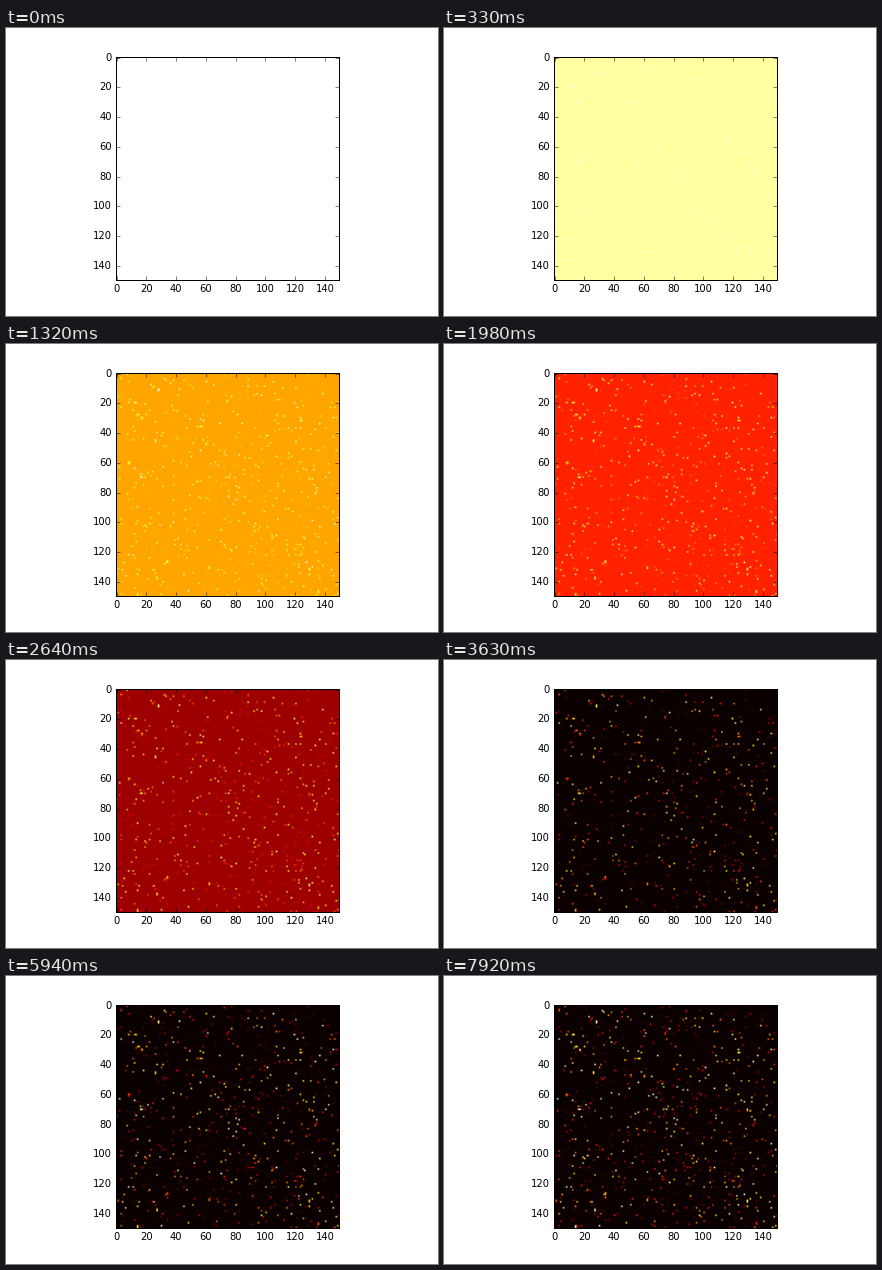
These frames come from a looping animation (432 px wide and 288 px high, 8 s). A matplotlib script:

```python
import numpy as np
import matplotlib.pyplot as plt
from matplotlib.animation import FuncAnimation

SIZE = 150          # cells per side
DOTS = 760          # cells that do not simply fade out
STEPS = 25
STEP_MS = 330
FADE = 0.0972       # loss per step
TURN = 11           # step at which the background has gone dark
TICK_MS = 20
LOOP_MS = 8000

plt.style.use("classic")
plt.rcParams.update({
    "font.family": "DejaVu Sans",
    "font.size": 10,
    "xtick.labelsize": 10,
    "ytick.labelsize": 10,
    "figure.facecolor": "white",
})


def dot_levels(rng):
    """Level of every dot at every step: uneven decay, then slow recovery."""
    fall = 1 - 0.9 * rng.random(DOTS) ** 1.6
    levels = np.ones((STEPS, DOTS))
    for s in range(1, STEPS):
        roll = rng.random(DOTS)
        if s <= TURN:
            change = -FADE * (0.6 * fall + 0.4 * (roll < fall))
        else:
            change = np.where(roll < 0.4, -FADE, FADE) / 2
        levels[s] = np.clip(levels[s - 1] + change, 0, 1)
    return levels


rng = np.random.default_rng(12)
cells = rng.choice(SIZE * SIZE, DOTS, replace=False)
levels = dot_levels(rng)


def field(step):
    base = max(0.0, 1 - FADE * step)
    grid = np.full(SIZE * SIZE, base)
    grid[cells] = np.maximum(base, levels[step])
    return grid.reshape(SIZE, SIZE)


fig, ax = plt.subplots(figsize=(6, 4), dpi=72)
fig.subplots_adjust(left=0.125, right=0.9, bottom=0.125, top=0.9)
image = ax.imshow(field(0), cmap="hot", vmin=0, vmax=1,
                  interpolation="bilinear", interpolation_stage="rgba")
ax.set_xticks(range(0, SIZE, 20))
ax.set_yticks(range(0, SIZE, 20))


def update(i):
    step = (i * TICK_MS + TICK_MS // 2) // STEP_MS
    image.set_data(field(min(step, STEPS - 1)))
    return [image]


anim = FuncAnimation(fig, update, frames=LOOP_MS // TICK_MS,
                     interval=TICK_MS, repeat=True, repeat_delay=0)
plt.show()
```
